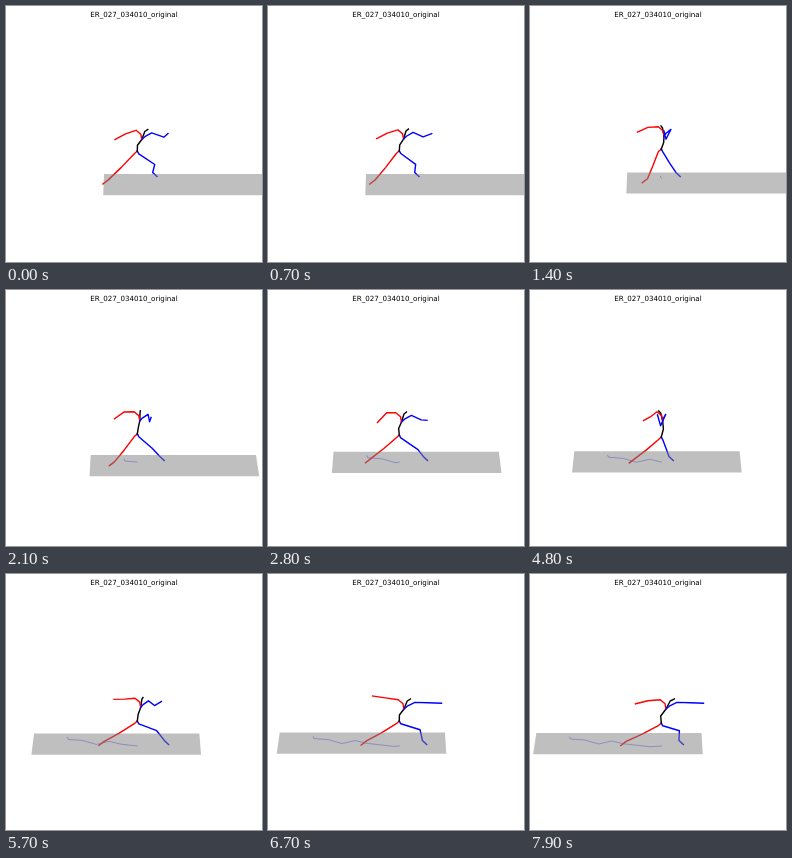
Write an HTML page with a canvas that moves like this. It is 256 px wide and 256 px high and loops after 8 s.

```html
<!DOCTYPE html>
<html lang="en">
<head>
<meta charset="utf-8">
<title>Stick figure lunges</title>
<style>
html, body { margin: 0; width: 100%; height: 100%; overflow: hidden; background: #fff; }
canvas { display: block; width: 100vw; height: 100vh; }
</style>
</head>
<body>
<canvas id="c"></canvas>
<script>
const LOOP = 8000, STEP = 100, SIZE = 256;
const HIP_X = 131.3, GROUND_Y = 172;       // pelvis, and its shadow on the ground
const START = 33.3;                        // pelvis to floor corner at rest
const FLOOR_W = 165.3, FLOOR_H = 21.2, SPREAD = 1.026;
const LIMB = 1.42, TRAIL = .4;

const canvas = document.getElementById('c');
const ctx = canvas.getContext('2d');

const add = (p, dx, dy) => [p[0] + dx, p[1] + dy];
const ease = k => k * k * (3 - 2 * k);
const lerp = (a, b, k) => a + (b - a) * k;
const mix = (a, b, k) => Array.isArray(a) ? a.map((v, i) => lerp(v, b[i], k)) : lerp(a, b, k);
const middle = (a, b) => mix(a, b, .5);

// Distance covered at time t by an eased move
function move(t, from, to, distance) {
  const k = Math.min(1, Math.max(0, (t - from) / (to - from)));
  return distance * ease(k);
}

const walked = t => move(t, 1200, 3850, 49.7) + move(t, 3700, 4700, 4)
  + move(t, 4900, 6500, 32.5) + move(t, 6600, 7900, 5.5);

const backToe = t => -1 + move(t, 300, 1400, 16) + move(t, 1800, 2800, 17)
  + move(t, 2800, 3700, 19) + move(t, 3700, 4700, 4)
  + move(t, 5200, 6400, 26.5) + move(t, 6700, 7900, 3);

const frontToe = t => 53 + move(t, 1500, 2700, 41) + move(t, 3200, 4700, 5)
  + move(t, 4900, 6100, 48);

// Turning points of the walk: [distance, depth on the floor]
const path = [[0, 4], [1, 6], [15, 7], [29, 11], [42, 8], [54, 10.8], [81, 13.8], [92, 13]];

function depthAt(s) {
  const i = Math.max(1, path.findIndex(p => p[0] >= s));
  const [a, b] = [path[i - 1], path[i]];
  return lerp(a[1], b[1], (s - a[0]) / (b[0] - a[0]));
}

// Elbows and the knee are offsets from the middle of their limb
const lunge = {
  hip: 145, chest: [135.8, 133.5], lean: 3, turn: 1, knee: [9, 1.4],
  backHand: [109, 133.5], backElbow: -1, frontHand: [162, 127.5], frontElbow: [4, 4]
};
const thrust = { ...lunge, frontHand: [168, 128], frontElbow: [1, 3] };
const gather = {
  hip: 143, chest: [134, 130], lean: -1.5, turn: .7, knee: [.3, 1],
  backHand: [107.5, 126], backElbow: -2, frontHand: [134, 125], frontElbow: [-1.5, 9]
};
const stride = {
  hip: 145, chest: [133.5, 132], lean: 2.5, turn: 1, knee: [6, 2.5],
  backHand: [109.5, 132.5], backElbow: -5, frontHand: [159, 130.3], frontElbow: [2, 2]
};
const reach = {
  hip: 149, chest: [138, 137], lean: 3, turn: 1.1, knee: [2, 8],
  backHand: [120, 136.5], backElbow: -1.5, frontHand: [169, 127.5], frontElbow: [3, 4]
};
const coil = {
  hip: 147, chest: [132.7, 131], lean: -2, turn: .3, knee: [0, 0],
  backHand: [113.5, 130.5], backElbow: .8, frontHand: [127.5, 125], frontElbow: [-1, 11]
};
const deep = {
  hip: 147, chest: [136, 135], lean: 3.2, turn: 1.1, knee: [8.5, -2.3],
  backHand: [104.5, 122], backElbow: 0, frontHand: [173.5, 129.2], frontElbow: [0, 0]
};
const settle = { ...deep, hip: 149, lean: 4.2, backHand: [105.5, 129.8], backElbow: -1 };

// Each pose is held for a while, then eases into the next
const moves = [
  { at: 0, hold: 0, pose: lunge }, { at: 400, hold: 100, pose: thrust },
  { at: 1400, hold: 100, pose: gather }, { at: 2800, hold: 0, pose: stride },
  { at: 3700, hold: 0, pose: reach }, { at: 4700, hold: 200, pose: coil },
  { at: 6300, hold: 400, pose: deep }, { at: 7900, hold: 0, pose: settle }
];

function poseAt(t) {
  const i = moves.findLastIndex(m => m.at <= t);
  const a = moves[i], b = moves[i + 1];
  if (!b) return a.pose;
  const from = a.at + a.hold, pose = {};
  const k = move(t, from, b.at, 1);
  for (const key in a.pose) pose[key] = mix(a.pose[key], b.pose[key], k);
  return pose;
}

function line(points, color, width) {
  ctx.beginPath();
  points.forEach(p => ctx.lineTo(p[0], p[1]));
  ctx.strokeStyle = color;
  ctx.lineWidth = width;
  ctx.stroke();
}

function drawTrail(s, left, top) {
  if (s <= 0) return;
  const trail = path.filter(p => p[0] < s).concat([[s, depthAt(s)]]);
  line(trail.map(p => add(p, left + START, top)), 'blue', TRAIL);
}

function drawFigure(t, left, top) {
  const p = poseAt(t);
  const hip = [HIP_X, p.hip];

  const backX = backToe(t);
  const rearToe = [left + backX, top + 10 + .03 * backX];
  const rearAnkle = add(rearToe, 5.3, -4.1);
  const rearHip = add(hip, -3, 2.7);
  line([hip, rearHip, add(middle(rearHip, rearAnkle), 0, .6), rearAnkle, rearToe], 'red', LIMB);

  const leadToe = [left + frontToe(t), 170.6];
  const leadAnkle = add(leadToe, -4.3, -4.2);
  const leadHip = add(hip, 1.5, 2.8);
  line([hip, leadHip, add(middle(leadHip, leadAnkle), ...p.knee), leadAnkle, leadToe], 'blue', LIMB);

  const neck = add(p.chest, p.lean, -8);
  const waist = add(middle(hip, p.chest), -.7 * p.lean, 0);
  line([hip, waist, p.chest, neck, add(neck, p.lean, -2)], 'black', LIMB);

  const rear = add(p.chest, -5.7, -9.2);
  const rearElbow = add(middle(rear, p.backHand), 0, p.backElbow);
  line([p.chest, add(p.chest, -1, -5.3), rear, rearElbow, p.backHand], 'red', LIMB);

  const lead = add(p.chest, 9.9 * p.turn, -6.6);
  const leadElbow = add(middle(lead, p.frontHand), ...p.frontElbow);
  line([p.chest, add(p.chest, 3 * p.turn, -2.8), lead, leadElbow, p.frontHand], 'blue', LIMB);
}

function drawFloor(x, y) {
  const near = v => SIZE / 2 + (v - SIZE / 2) * SPREAD;
  ctx.beginPath();
  ctx.moveTo(x, y);
  ctx.lineTo(x + FLOOR_W, y);
  ctx.lineTo(near(x + FLOOR_W), y + FLOOR_H);
  ctx.lineTo(near(x), y + FLOOR_H);
  ctx.fillStyle = 'rgba(128,128,128,.5)';
  ctx.fill();
}

function drawTitle() {
  ctx.fillStyle = '#000';
  ctx.font = '7.11px "DejaVu Sans", sans-serif';
  ctx.textRendering = 'geometricPrecision';
  ctx.textAlign = 'center';
  ctx.fillText('ER_027_034010_original', SIZE / 2, 10.5);
}

function draw(t) {
  const scale = canvas.width / SIZE;
  ctx.setTransform(scale, 0, 0, scale, 0, 0);
  ctx.fillStyle = '#fff';
  ctx.fillRect(0, 0, SIZE, SIZE);
  ctx.lineJoin = 'round';
  ctx.lineCap = 'square';

  const s = walked(t);
  const left = HIP_X - START - s;
  const top = GROUND_Y - depthAt(s);
  drawTrail(s, left, top);
  drawFigure(t, left, top);
  drawFloor(left, top);
  drawTitle();
}

canvas.width = canvas.height = Math.round(SIZE * (window.devicePixelRatio || 1));
const start = performance.now();
function tick(now) {
  const t = Math.max(0, now - start) % LOOP;
  draw(Math.floor(t / STEP) * STEP);
  requestAnimationFrame(tick);
}
draw(0);
requestAnimationFrame(tick);
</script>
</body>
</html>
```
